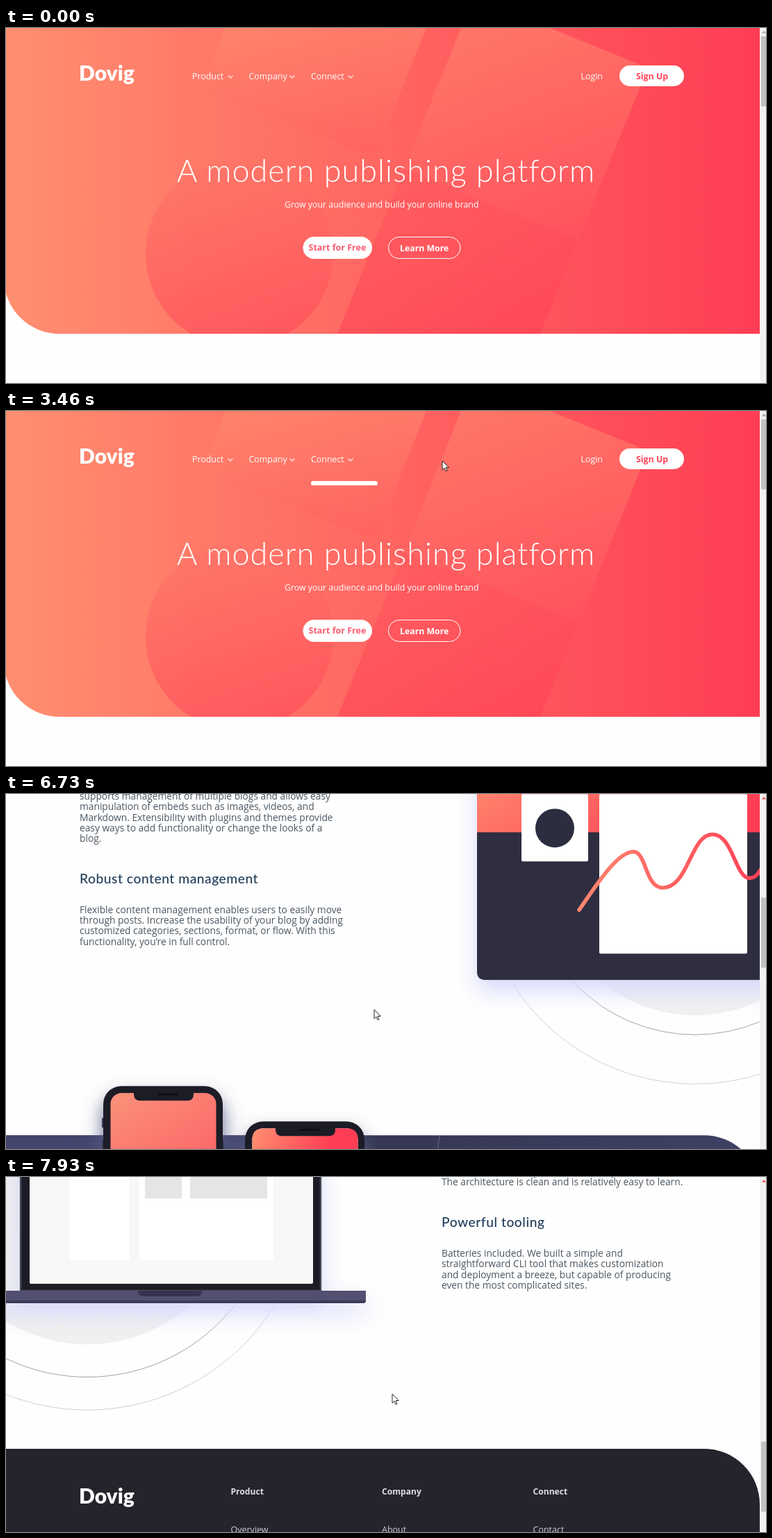
Write an HTML page that moves like this. It is 1094x512 px and loops after 8000 ms.

```html
<!DOCTYPE html>
<html lang="en">
<head>
<meta charset="utf-8">
<title>Publishing platform</title>
<style>
  html, body { margin: 0; width: 100%; height: 100%; overflow: hidden; background: #fefefe; }
  #stage { display: block; width: 1094px; height: 512px; font-family: "Open Sans", "Noto Sans", sans-serif; }
  .head { font-family: Lato, "Open Sans", sans-serif; }
</style>
</head>
<body>
<svg id="stage" viewBox="0 0 1094 512">
  <g id="page"></g>
  <g id="bar"></g>
  <g id="pointer" stroke="#111" stroke-width=".9" fill="#fff"></g>
</svg>
<script>
const LOOP = 8000, BRAND = "Dovig";
const ORANGE = "#ff8f70", RED = "#ff3d54", NAVY = "#1f3e5a", INK = "#1b1c26";
const $ = id => document.getElementById(id);

// ---- drawing helpers ----
const rect = (x, y, w, h, fill, r = 0, more = "") =>
  `<rect x="${x}" y="${y}" width="${w}" height="${h}" rx="${r}" fill="${fill}" ${more}/>`;
const circle = (x, y, r, more) => `<circle cx="${x}" cy="${y}" r="${r}" ${more}/>`;
const path = (d, more) => `<path d="${d}" ${more}/>`;
const text = (x, y, size, fill, str, more = "") =>
  `<text x="${x}" y="${y}" font-size="${size}" fill="${fill}" ${more}>${str}</text>`;
const head = (x, y, size, fill, str, weight, spacing) =>
  text(x, y, size, fill, str, `class="head" font-weight="${weight}" letter-spacing="${spacing}"`);
const para = (x, y, size, pitch, fill, lines) =>
  lines.map((line, i) => text(x, y + i * pitch, size, fill, line)).join("");
const grad = (id, x2, y2, from, to) =>
  `<linearGradient id="${id}" x2="${x2}" y2="${y2}"><stop stop-color="${from}"/><stop offset="1" stop-color="${to}"/></linearGradient>`;
const shadow = (id, dy, blur, color) =>
  `<filter id="${id}" x="-30%" y="-30%" width="160%" height="160%"><feDropShadow dx="0" dy="${dy}" stdDeviation="${blur}" flood-color="${color}"/></filter>`;
const rings = (x, y, radii, disc, inner, outer) =>
  circle(x, y, radii[0], `fill="${disc}"`) +
  circle(x, y, radii[1], `fill="none" stroke="${inner}"`) +
  circle(x, y, radii[2], `fill="none" stroke="${outer}"`);

const darkShape = "M0 1219H1005a80 80 0 0 1 80 80V1601H77a80 80 0 0 1-80-80V1219z";

const defs = `<defs>
  ${grad("hero", 1, 0, ORANGE, RED)}
  ${grad("slabA", 0, 1, "#ff9070", "#ff6060")}
  ${grad("slabB", 0, 1, ORANGE, "#ff5560")}
  ${grad("slabC", 0, 1, "#ff5a60", RED)}
  ${grad("ball", 0, 1, "#ff7669", "#ff4257")}
  ${grad("card", .75, .2, ORANGE, RED)}
  ${grad("screen", .3, 1, "#fa927a", "#ff4058")}
  ${grad("wave", 1, 0, "#ff8670", RED)}
  ${grad("dark", 1, 0, "#2c2d3f", "#3f4165")}
  ${grad("discDark", 0, 1, "#3c3e60", "#484a76")}
  ${grad("disc", 0, 1, "#eaebed", "#f0f0f0")}
  ${shadow("lift", 16, 16, "#d8dafb")}
  ${shadow("glow", 16, 14, "#5a6288")}
  ${shadow("soft", 3, 4, "#e2e7fa")}
  <clipPath id="darkClip">${path(darkShape, "")}</clipPath>
</defs>`;

const hero =
  path("M-3 0H1085V441H77A80 80 0 0 1-3 361z", 'fill="url(#hero)"') +
  `<g opacity=".5">` +
  path("M316 0H605L537 170Q531 187 514 180L282 85z", 'fill="url(#slabA)"') +
  path("M655 0H783L906 50Q924 57 917 75L824 305 573 203z", 'fill="url(#slabB)"') +
  path("M573 203L824 305 769 441H477z", 'fill="url(#slabC)"') +
  path("M266 441A135 135 0 1 1 406 441z", 'fill="url(#ball)"') + `</g>` +
  head(105, 76, 30, "#fff", BRAND, 900, 0) +
  head(246, 222, 45, "#fff", "A modern publishing platform", 300, 1) +
  text(401, 258.5, 12.36, "#fff", "Grow your audience and build your online brand");

const editor =
  head(370, 552, 32, NAVY, "Designed for the future", 600, .5) +
  rings(992, 834, [212, 240, 311], "url(#disc)", "#a5a3a6", "#d0d0d2") +
  rect(678, 673, 628, 322, "#2d2d40", 10, 'filter="url(#lift)"') +
  path("M678 782V683q0-10 10-10H1306V782z", 'fill="url(#card)"') +
  rect(742, 727, 96, 97, "#fff", 2) + rect(854, 727, 213, 230, "#fff", 2) +
  circle(790, 776, 28, 'fill="#2d2d40"') +
  path("M825 894C850 858 880 810 903 810C922 810 920 862 945 862C983 862 985 785 1017 785C1046 785 1050 848 1070 848C1084 848 1088 830 1100 815",
    'fill="none" stroke="url(#wave)" stroke-width="5.5" stroke-linecap="round"') +
  head(106, 662, 19.2, NAVY, "Introducing an extensible editor", 500, .55) +
  para(106, 704.4, 13.75, 15.3, "#4a5661", [
    BRAND + " features an exceedingly intuitive interface which",
    "lets you focus on one thing: creating content. The editor",
    "supports management of multiple blogs and allows easy",
    "manipulation of embeds such as images, videos, and",
    "Markdown. Extensibility with plugins and themes provide",
    "easy ways to add functionality or change the looks of a",
    "blog."]) +
  head(106, 856, 19.2, NAVY, "Robust content management", 500, .55) +
  para(106, 898.5, 13.75, 15.3, "#4a5661", [
    "Flexible content management enables users to easily move",
    "through posts. Increase the usability of your blog by adding",
    "customized categories, sections, format, or flow. With this",
    "functionality, you’re in full control."]);

const phone = (x, y, screen) => `<g transform="translate(${x} ${y})">` +
  rect(-2, 46, 4, 14, INK, 1) + rect(-2, 78, 4, 26, INK, 1) + rect(170, 78, 4, 38, INK, 1) +
  rect(0, 0, 172, 353, INK, 26, 'filter="url(#glow)"') + screen +
  path("M44 9H130V12q0 9-9 9H53q-9 0-9-9z", `fill="${INK}"`) +
  rect(78, 11, 24, 2, "#08080c", 1) + circle(105, 12, 1.6, 'fill="#08080c"') + `</g>`;

const listScreen = rect(10.5, 10, 152, 332, "#f7f9ff", 16) +
  path("M10.5 130V26q0-16 16-16H146.500q16 0 16 16V130z", 'fill="url(#card)"') +
  [105, 164, 223, 282].map(y => rect(19, y, 134, 48, "#fff", 3, 'filter="url(#soft)"')).join("");

const infrastructure =
  path(darkShape, 'fill="url(#dark)"') +
  `<g clip-path="url(#darkClip)">` +
  rings(213, 1188, [240, 273, 412], "url(#discDark)", "#8588a0", "#6b6c80") + `</g>` +
  phone(140, 1148, rect(10.5, 10, 152, 332, "url(#screen)", 16)) +
  phone(344, 1199, listScreen) +
  head(551, 1383, 25.6, "#fff", "State of the Art Infrastructure", 600, .45) +
  para(551, 1419, 12.55, 14.6, "#d3d3de", [
    "With reliability and speed in mind, worldwide data centers provide the",
    "backbone for ultra-fast connectivity. This ensures your site will load",
    "instantly, no matter where your readers are, keeping your site",
    "competitive."]);

const laptop =
  rings(117, 1973.5, [222, 269, 316.5], "url(#disc)", "#a0a0a4", "#cfcfd2") +
  `<g filter="url(#lift)">` +
  path("M21 2118V1834q0-8 8-8H445q8 0 8 8V2118z", `fill="${INK}" stroke="#4c4c56" stroke-width="2.5"`) +
  path("M-44 2118H518V2132q0 4-4 4H-44z", 'fill="#53506f"') + `</g>` +
  path("M-44 2132H518q0 4-4 4H-44z", 'fill="#3b3a57"') +
  path("M190 2118H282q0 8-8 8H198q-8 0-8-8z", 'fill="#353350"') +
  rect(34, 1838, 408, 270, "#f8f7f5", 2) + rect(34, 1838, 408, 48, "url(#card)", 2) +
  rect(92, 1868, 86, 206, "#fff", 1) + rect(192, 1868, 193, 206, "#fff", 1) +
  rect(200, 1879, 176, 52, "#e5e5e5", 1) +
  rect(200, 1943, 53, 42, "#e5e5e5", 1) + rect(265, 1943, 111, 42, "#e5e5e5", 1) +
  head(627, 1847, 19.2, NAVY, "Free, open, simple", 500, .55) +
  para(627, 1889.5, 13.75, 15.3, "#4a5661", [
    BRAND + " is a free and open source application backed by",
    "a large community of helpful developers. It supports",
    "features such as code syntax highlighting, RSS feeds,",
    "social media integration, third-party commenting tools,",
    "and works seamlessly with Ostrel Analytics.",
    "The architecture is clean and is relatively easy to learn."]) +
  head(627, 2026, 19.2, NAVY, "Powerful tooling", 500, .55) +
  para(627, 2069, 13.75, 15.3, "#4a5661", [
    "Batteries included. We built a simple and",
    "straightforward CLI tool that makes customization",
    "and deployment a breeze, but capable of producing",
    "even the most complicated sites."]);

const menus = [
  { name: "Product", x: 268, arrow: 323, width: 108, items: ["Overview", "Pricing", "Marketplace", "Features", "Integrations"],
    hover: [1100, 1750], open: [[1150, 0], [1550, 132], [1750, 132], [2000, 0]] },
  { name: "Company", x: 349.5, arrow: 412, width: 78, items: ["About", "Team", "Blog", "Careers"],
    hover: [2220, 2830], open: [[2250, 0], [2440, 75], [2560, 120], [2800, 120], [2980, 0]] },
  { name: "Connect", x: 439, arrow: 496, width: 96, items: ["Contact", "Newsletter", "Peerhall"],
    hover: [2830, 3330], open: [[2860, 0], [3100, 78], [3250, 78], [3480, 0]] }
];

const footer =
  path("M0 2346H1005a80 80 0 0 1 80 80V2700H0z", 'fill="#24242d"') +
  head(105, 2425, 30, "#fff", BRAND, 900, 0) +
  menus.map((m, i) => {
    const x = 323.5 + i * 217.5;
    return text(x, 2412, 12.1, "#e0dde2", m.name, 'font-weight="700"') +
      para(x, 2467, 12.5, 24, "#cfccd2", m.items);
  }).join("");

$("page").innerHTML = defs + hero + editor + infrastructure + laptop + footer + `<g id="live"></g>`;

// ---- motion ----
const scrollKeys = [[5740, 0], [5900, 40], [6110, 145], [6730, 726], [7530, 1380], [7930, 1954]];
const statusKeys = [[5280, 18], [5340, 0], [5950, 0], [6110, 16], [6150, 18]];
const pointerKeys = [
  [370, 1045, 498], [700, 800, 300], [1140, 290, 74], [1500, 292, 78], [1700, 272, 125],
  [2010, 222, 150], [2220, 360, 82], [2440, 376.5, 73.5], [2700, 380, 76], [2880, 460, 72],
  [3200, 468, 74], [3450, 620, 72], [3750, 842, 70], [3980, 925, 70], [4150, 915, 76],
  [4500, 652, 171], [4800, 490, 316], [5100, 500, 322], [5350, 590, 320], [5700, 585, 322],
  [6000, 538, 326], [6300, 538, 322], [6730, 530, 311], [7530, 538, 311], [7930, 556, 313]];
const hovers = { login: [3680, 3850], sign: [3900, 4220], start: [4730, 5180], learn: [5280, 6500] };

function at(keys, t, col = 1) {
  const i = keys.findIndex(k => k[0] > t);
  if (i < 0) return keys[keys.length - 1][col];
  if (!i) return keys[0][col];
  const a = keys[i - 1], b = keys[i];
  return a[col] + (b[col] - a[col]) * (t - a[0]) / (b[0] - a[0]);
}
const within = ([a, b], t) => t >= a && t < b;
const linkStyle = on => on ? 'font-weight="700" text-decoration="underline"' : "";

function navigation(t) {
  let shift = 0;
  return menus.map(m => {
    const on = within(m.hover, t), x = m.x + shift, h = at(m.open, t);
    if (on) shift += 2;
    const arrow = m.arrow + shift;
    return text(x, 73.5, 12.4, "#fff", m.name, linkStyle(on)) +
      path(`M${arrow - 3.5} 68.500l3.500 3.500 3.500-3.500`, 'fill="none" stroke="#ffc9bf" stroke-width="1.8"') +
      (h > 0 ? `<svg x="${x}" y="101" width="${m.width}" height="${h}">` +
        rect(0, 0, m.width, h, "#fff", Math.min(8, h / 2)) +
        para(16.5, 20.5, 12.8, 29.6, "#24242d", m.items) + `</svg>` : "");
  }).join("");
}

function buttons(t) {
  const fill = key => within(hovers[key], t) ? "rgba(255,255,255,.78)" : "#fff";
  const learn = within(hovers.learn, t), bold = 'font-weight="700"';
  return text(827.5, 73.5, 12.4, "#fff", "Login", linkStyle(within(hovers.login, t))) +
    rect(883, 54, 93, 30, fill("sign"), 15) + text(907, 74, 12.4, "#ff4257", "Sign Up", bold) +
    rect(427.5, 301, 99.5, 32, fill("start"), 16) + text(435.5, 320.5, 12.5, "#fd5a70", "Start for Free", bold) +
    rect(550.5, 301.5, 103.5, 31, learn ? fill("learn") : "none", 15.5, 'stroke="#fff"') +
    text(567, 321.5, 12.3, learn ? "#fd6577" : "#fff", "Learn More", bold);
}

function chrome(t, scroll) {
  const drop = at(statusKeys, t);
  return (drop < 18 ? rect(-1, 495.5 + drop, 67, 20, "#f0f0f0", 0, 'stroke="#c4c4c4"') : "") +
    rect(1085, 0, 9, 512, "#f1f1f1") +
    rect(1087, 12 + scroll / 5.285, 7, 101, "#c1c1c1") +
    path("M1088 7.500l3-3.500 3 3.500z", `fill="${scroll ? "#f0474f" : "#a3a3a3"}"`);
}

function pointer(t) {
  if (t < 370) return "";
  const links = [...menus.map(m => m.hover), hovers.login, hovers.sign, hovers.start, [5280, 5780]];
  const hand = links.some(span => within(span, t));
  return path(hand
    ? "M-1.5 1.5a1.5 1.5 0 0 1 3 0V7l6 1.5q2 .8 1.700 3l-1 4.500V19H.7v-2l-4.500-6q-.6-1.600 1-1.600l1.300 1.200z"
    : "M0 0V13l3-2.800 2 4.800 2-.9-2-4.600h4.200z",
    `transform="translate(${at(pointerKeys, t)} ${at(pointerKeys, t, 2)})"`);
}

function draw(now) {
  const t = now % LOOP, scroll = at(scrollKeys, t);
  $("page").setAttribute("transform", `translate(0 ${-scroll})`);
  $("live").innerHTML = buttons(t) + navigation(t);
  $("bar").innerHTML = chrome(t, scroll);
  $("pointer").innerHTML = pointer(t);
}

const begin = performance.now();
function tick() {
  draw(performance.now() - begin);
  requestAnimationFrame(tick);
}
tick();
</script>
</body>
</html>
```
